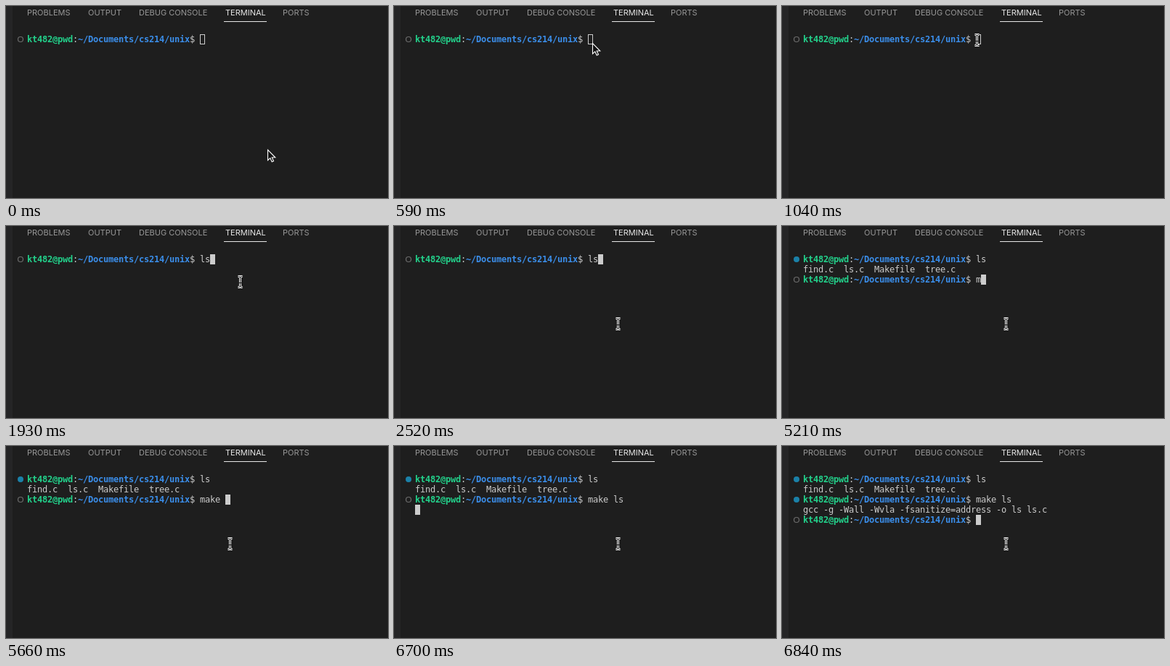
An HTML page with a canvas for the animation above (8000 ms loop, 526 px wide and 265 px high).

```html
<!DOCTYPE html>
<html lang="en">
<head>
<meta charset="utf-8">
<title>Terminal session</title>
<style>
  html, body { margin: 0; width: 100%; height: 100%; overflow: hidden; background: #1e1e1e; }
  canvas { display: block; }
</style>
</head>
<body>
<canvas id="stage" width="526" height="265"></canvas>
<script>
const ctx = document.getElementById('stage').getContext('2d');
const LOOP = 8000, LEFT = 29, TOP = 39, CELL = 7, LINE = 14;
const TEXT = '#cccccc', GREEN = '#23d18b', BLUE = '#3b8eea';
const PROMPT_COLS = 34;

const tabs = [['PROBLEMS', 29], ['OUTPUT', 113], ['DEBUG CONSOLE', 183], ['TERMINAL', 302], ['PORTS', 381]];

// [time, left, top] of the pointer; it turns into a text beam at BEAM_AT
const BEAM_AT = 1040, FOCUS_AT = 1330;
const pointer = [
  [0, 360, 198], [290, 350, 176], [440, 302, 83], [590, 273, 51], [740, 267, 43], [890, 268, 45],
  [1040, 264, 38], [1330, 318, 68], [2220, 315, 85], [2370, 305, 126], [2520, 304, 126]
];

// [time, typed text]; a blank is a cell whose letter is not painted yet
const LIST_AT = 3110, RUN_AT = 6700, DONE_AT = 6840;
const typedList = [[0, ''], [1780, 'l '], [1930, 'ls']];
const typedMake = [[0, ''], [5210, 'm'], [5360, 'ma '], [5510, 'make'], [5660, 'make '], [5950, 'make l'], [6100, 'make ls']];

const at = (steps, t) => steps.findLast(step => step[0] <= t);

const arrow = new Path2D('M.5 .5V15L3.8 11.9L6.2 17L8.5 16L6.2 11H10.8Z');
const beam = new Path2D('M1.5 1.5H2.5Q4.5 1.5 4.5 4V14Q4.5 16.5 2.5 16.5H1.5M7.5 1.5H6.5Q4.5 1.5 4.5 4M4.5 14Q4.5 16.5 6.5 16.5H7.5M3 10.5H6');

function write(text, col, row, color = TEXT, bold = false) {
  ctx.font = `${bold ? 'bold ' : ''}12px "DejaVu Sans Mono", monospace`;
  ctx.fillStyle = color;
  [...text].forEach((ch, i) => ctx.fillText(ch, LEFT + (col + i) * CELL, TOP + row * LINE + 11));
}

function prompt(row, command, done) {
  write('kt482@pwd', 0, row, GREEN, true);
  write(':', 9, row);
  write('~/Documents/cs214/unix', 10, row, BLUE, true);
  write('$ ' + command, 32, row);
  ctx.beginPath();
  ctx.arc(20, TOP + row * LINE + 7, done ? 4 : 3.5, 0, 7);
  if (done) {
    ctx.fillStyle = '#1b81a8';
    ctx.fill();
  } else {
    ctx.strokeStyle = '#6c6c6c';
    ctx.lineWidth = 1.2;
    ctx.stroke();
  }
}

function cursor(col, row, focused) {
  const x = LEFT + col * CELL, y = TOP + row * LINE;
  ctx.lineWidth = 1;
  ctx.fillStyle = ctx.strokeStyle = TEXT;
  if (focused) ctx.fillRect(x, y, CELL, LINE);
  else ctx.strokeRect(x + .5, y + .5, CELL - 1, LINE - 1);
}

function drawPanel() {
  ctx.fillStyle = '#1e1e1e';
  ctx.fillRect(0, 0, 526, 265);
  ctx.fillStyle = '#252526';
  ctx.fillRect(0, 0, 9, 265);
  ctx.font = '11px Inter, sans-serif';
  for (const [name, x] of tabs) {
    ctx.fillStyle = name === 'TERMINAL' ? '#e7e7e7' : '#979797';
    ctx.fillText(name, x, 13);
  }
  ctx.fillStyle = '#e7e7e7';
  ctx.fillRect(300, 21, 59, 1);
}

function drawTerminal(t) {
  const listed = t >= LIST_AT, done = t >= DONE_AT;
  const first = at(typedList, t)[1], second = at(typedMake, t)[1];
  prompt(0, first, listed);
  if (!listed) return cursor(PROMPT_COLS + first.length, 0, t >= FOCUS_AT);

  write('find.c  ls.c  Makefile  tree.c', 0, 1);
  prompt(2, second, done);
  if (t < RUN_AT) return cursor(PROMPT_COLS + second.length, 2, true);
  if (!done) return cursor(0, 3, true);

  write('gcc -g -Wall -Wvla -fsanitize=address -o ls ls.c', 0, 3);
  prompt(4, '', false);
  cursor(PROMPT_COLS, 4, true);
}

function drawPointer(t) {
  const [, x, y] = at(pointer, t);
  ctx.save();
  ctx.translate(x, y);
  ctx.strokeStyle = '#ffffff';
  if (t < BEAM_AT) {
    ctx.fillStyle = '#111111';
    ctx.fill(arrow);
    ctx.lineWidth = 1.1;
    ctx.stroke(arrow);
  } else {
    ctx.lineWidth = 3;
    ctx.stroke(beam);
    ctx.strokeStyle = '#111111';
    ctx.lineWidth = 1;
    ctx.stroke(beam);
  }
  ctx.restore();
}

function frame() {
  const t = performance.now() % LOOP;
  drawPanel();
  drawTerminal(t);
  drawPointer(t);
  requestAnimationFrame(frame);
}
frame();
</script>
</body>
</html>
```
